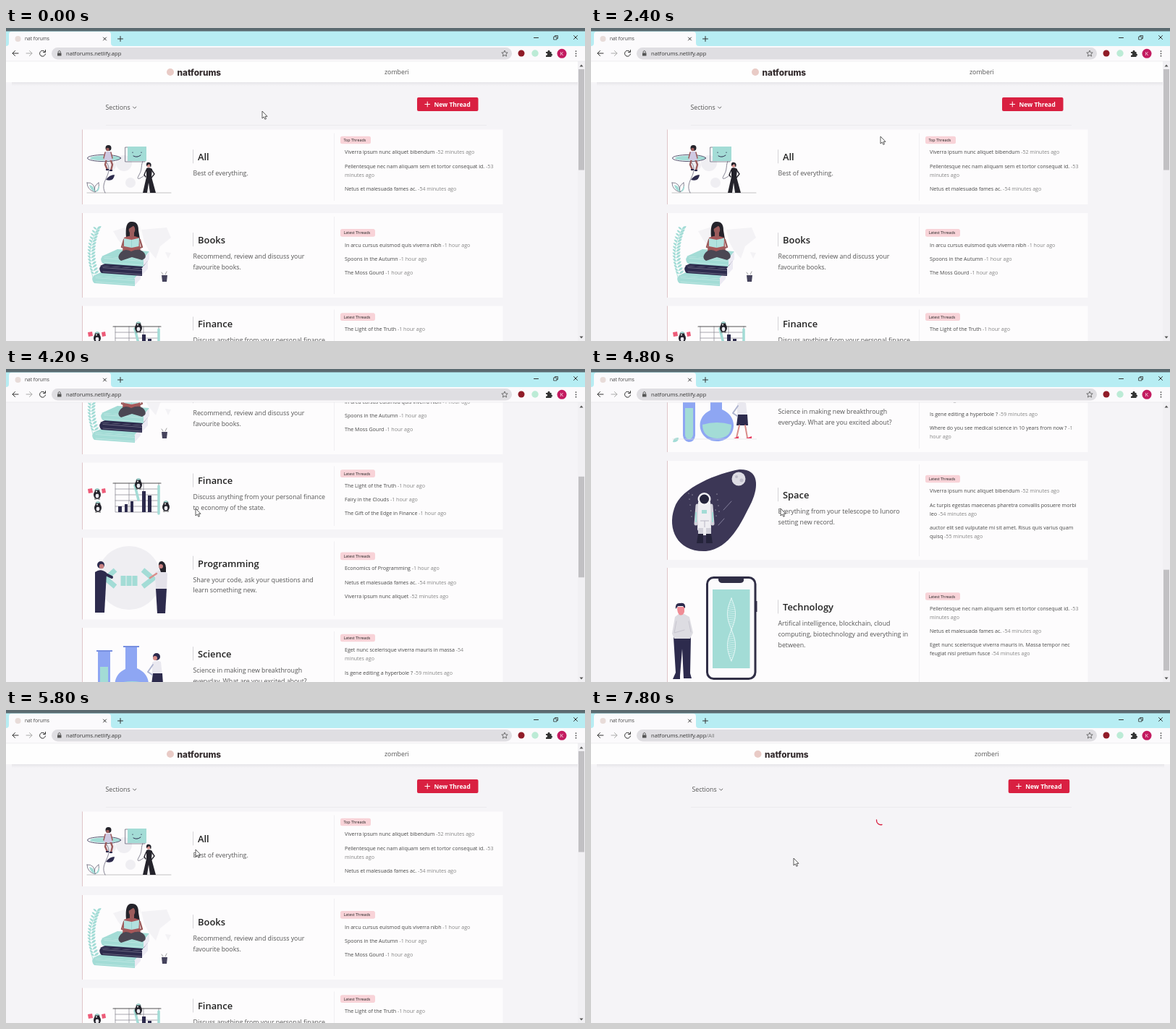
Write an HTML page that moves like this. It is 800 px wide and 433 px high and loops after 8 s.

```html
<!DOCTYPE html>
<html lang="en">
<head>
<meta charset="utf-8">
<title>nat forums</title>
<style>
  html, body { margin: 0; width: 100%; height: 100%; overflow: hidden; background: #f5f4f7; }
  svg { display: block; width: 100vw; height: 100vh; }
  text { font-family: "Open Sans", "Noto Sans", sans-serif; fill: #555; }
  .small { font-size: 7.1px; fill: #484848; }
  .small .ago { fill: #858585; }
  .desc { font-size: 8.8px; }
  .title { font-size: 12.9px; font-weight: 600; fill: #222; }
  .badge { font-size: 5.4px; fill: #222; }
  .line { fill: none; stroke-linecap: round; stroke-linejoin: round; }
  .ink { fill: #2d2b4d; } .teal { fill: #a3dcd6; } .skin { fill: #9c5c5c; }
  .black { fill: #24232b; } .pale { fill: #efeef2; } .blue { fill: #8ea6f3; }
  #spinner, #path, .loading #cards, .loading #scrollbar, .loading #hover { display: none; }
  .loading #spinner, .loading #path { display: inline; }
  .loading #logo { transform: translateX(3.5px); }
  .loading #user { transform: translateX(7px); }
  .loading #sections { transform: translateX(2px); }
  .loading #button { transform: translateX(8.7px); }
</style>
</head>
<body>
<svg id="stage" viewBox="0 0 800 433" preserveAspectRatio="none">
  <defs>
    <clipPath id="view"><rect y="46" width="800" height="387"/></clipPath>
    <linearGradient id="shade" x2="0" y2="1">
      <stop stop-color="#e6e5e9"/><stop offset="1" stop-color="#f5f4f7"/>
    </linearGradient>

    <g id="art-all">
      <g class="pale"><circle cx="163" cy="187" r="11"/><circle cx="145" cy="190" r="7"/><circle cx="172" cy="214" r="7"/></g>
      <g class="line" stroke="#555468" stroke-width=".7">
        <path d="M112 228H228" stroke="#aaa"/>
        <path d="M137 228C128 212 150 202 139 186M193 179C184 188 190 193 184 203S188 207 192 203"/>
        <rect x="165" y="165" width="27" height="20"/>
        <path d="M112 214Q123 213 123 227Q112 224 112 214M128 214Q120 219 123 227Q130 223 128 214"/>
      </g>
      <path class="teal" d="M115 217Q122 218 123 227Q116 224 115 217M129 218L124 227Q130 225 129 218"/>
      <path class="ink" d="M138 210Q143 203 150 203Q149 213 138 210"/>
      <ellipse class="teal" cx="137" cy="180" rx="21" ry="3.6"/>
      <ellipse class="line" cx="135.500" cy="180" rx="23" ry="4.600" stroke="#2d2b4d" stroke-width=".8"/>
      <path class="line" d="M139 181L137 189L140 196M144 181L147 189L145 197" stroke="#9c5c5c" stroke-width="2.400"/>
      <path class="ink" d="M138 195h4v2h-4ZM143 196h4v2h-4Z"/>
      <path d="M137 171H145L147 183H135Z" fill="#cfc9e2"/>
      <path class="line" d="M137 172L135 180M145 172L147 180" stroke="#9c5c5c" stroke-width="1.5"/>
      <circle class="black" cx="141.500" cy="166" r="4"/><circle class="skin" cx="140.500" cy="168" r="2.300"/>
      <rect class="teal" x="168" y="164" width="26" height="20"/>
      <g class="line" stroke="#2d2b4d" stroke-width="1"><path d="M176 177Q181 180 186 176M175 172v.5M187 172v.5"/></g>
      <path class="black" d="M194 194Q198 192 202 195L201 206L207 228H199L197 214L195 228H189L194 206Z"/>
      <path class="line" d="M194 196L191 203L193 206M201 196L205 202L201 207" stroke="#24232b" stroke-width="1.4"/>
      <circle cx="197" cy="190" r="2.7" fill="#d89591"/><path class="black" d="M194 191Q193 185 198 186Q202 187 200 193L198 188Z"/>
    </g>

    <g id="book">
      <path d="M0 0L22-10L66-7L58 4Z"/>
      <path d="M57 4L66-7V4L57 14Z" fill="#eceaf3"/>
      <path d="M1 0L58 4V14L2 10Q-3 5 1 0"/>
      <path class="line" d="M4 2.500L57 6.500M4 8L57 12" stroke="#fff" stroke-opacity=".35" stroke-width=".8"/>
    </g>
    <g id="art-books">
      <g class="pale"><path d="M148 281L164 276L180 290L165 306L155 293ZM187 279L222 276L228 290L213 302L207 319L197 307L191 296ZM220 310L228 311L224 319Z" opacity=".7"/></g>
      <g id="fern"></g>
      <use href="#book" class="teal" x="120" y="343"/>
      <use href="#book" class="ink" x="130" y="329"/>
      <use href="#book" class="teal" x="132" y="316"/>
      <path class="black" d="M166 290Q164 268 173 268Q183 267 183 280L185 292Z"/>
      <path d="M163 290Q173 285 184 290L186 309H161Z" fill="#a85759"/>
      <path class="skin" d="M171 283H177V290H171Z"/><ellipse class="skin" cx="174" cy="279" rx="4.300" ry="6"/>
      <path class="black" d="M168 279Q169 270 175 271L180 274L177 273Z"/>
      <path d="M158 311Q164 304 173 309Q184 303 191 311Q196 318 188 321L174 317L159 322Q152 318 158 311" fill="#4b4753"/>
      <path class="line" d="M163 293L160 303L168 306M185 293L188 303L180 306" stroke="#9c5c5c" stroke-width="2.400"/>
      <path d="M163 291L173.500 293L184 290.500L183.500 302L173.500 304L163 302Z" fill="#b2e1de"/>
      <path d="M173.500 293V304" stroke="#8bc8c5" stroke-width=".6"/>
      <path d="M215 342H223L222 351H216Z" fill="#45435c"/><path class="line" d="M217 341L215 338M220 341L222 337" stroke="#777" stroke-width=".7"/>
    </g>

    <g id="penguin">
      <ellipse class="black" rx="5" ry="6"/><ellipse cy="1.500" rx="2.300" ry="3" fill="#e9e8ee"/>
      <circle class="black" cy="-5" r="3.400"/><circle cx="-1" cy="-4.500" r="1" fill="#fff"/>
      <path class="teal" d="M-3.500-6.500Q0-11.500 3.500-6.500Z"/><path d="M-4 6H-1M1 6H4" stroke="#555" stroke-width="1.2"/>
    </g>
    <g id="art-finance">
      <g class="line" stroke="#85848f" stroke-width=".7">
        <path d="M151 413V453H211V413M151 421H210M151 429H210M151 437H210M151 445H210M170 413V453M190 413V453"/>
        <path d="M148 413H214" stroke="#555" stroke-width="1.100"/>
      </g>
      <path class="ink" d="M155 445h5v8h-5ZM164 442h4v11h-4ZM172 438h4v15h-4ZM188 424h5v29h-5ZM196 430h5v23h-5Z"/>
      <path class="line" d="M178 416L183 436M211 417V455" stroke="#a3dcd6" stroke-width="3.500"/>
      <path d="M113 421l6-1 1 6-6 1ZM132 421l5-1 1 6-5 1Z" fill="#ed5b78"/>
      <use href="#penguin" x="126" y="429"/><use href="#penguin" x="127" y="447"/>
      <use href="#penguin" x="183" y="415"/><use href="#penguin" x="221" y="446"/>
    </g>

    <g id="art-coding">
      <circle class="pale" cx="170" cy="544" r="44"/>
      <path class="line" d="M151 533L138 545L151 556M189 533L203 545L189 556M162 541V555M170 541V555M178 541V555" stroke="#a3dcd6" stroke-width="7" style="stroke-linecap:butt"/>
      <path class="ink" d="M123 536Q131 530 139 537L136 592H123Z"/>
      <path class="line" d="M136 538L146 543" stroke="#2d2b4d" stroke-width="4"/>
      <path d="M206 536Q216 530 223 538L222 560H207Z" fill="#e4e2ea"/><path class="ink" d="M207 559H222L220 593H209Z"/>
      <path class="line" d="M208 538L199 544" stroke="#d98e8b" stroke-width="2.500"/>
      <circle class="ink" cx="131" cy="526" r="5"/><circle cx="132" cy="528" r="3.2" fill="#c77f80"/>
      <path class="black" d="M211 528Q210 520 216 521Q222 523 221 536H214Z"/><circle cx="214" cy="528" r="3" fill="#c77f80"/>
    </g>

    <g id="art-science">
      <path class="blue" d="M127 646H144V705Q143 714 135 714Q128 713 127 705ZM165 640H181V669C207 680 199 713 174 713S141 681 165 670Z"/>
      <path class="teal" d="M130 667H141V704Q140 710 135 710Q130 709 130 704ZM154 690Q174 684 194 690Q194 709 174 709Q154 708 154 690"/>
      <path d="M125 645H147M162 639H184" stroke="#778fe0" stroke-width="2"/>
      <path class="teal" d="M113 714Q114 707 121 708Q121 715 113 714"/>
      <path d="M202 661Q207 657 214 660L216 679H202Z" fill="#e9e8ef"/>
      <path class="ink" d="M203 676H216L217 691H201Z"/>
      <path class="line" d="M205 691L201 708M213 691L216 708" stroke="#d98e8b" stroke-width="2"/>
      <path d="M197 709h7v-3ZM214 709h8v-3Z" fill="#e83e62"/>
      <path class="line" d="M203 664L196 674L202 678" stroke="#aeb4cf" stroke-width="2"/>
      <circle class="ink" cx="208" cy="653" r="5"/><circle cx="206" cy="655" r="3" fill="#d98e8b"/>
      <path d="M112 710H229" stroke="#ddd" stroke-width=".6"/>
    </g>

    <g id="art-space">
      <path d="M205 752C232 751 232 775 222 797C207 827 192 861 159 865C120 867 105 835 115 806C124 776 177 757 205 752Z" fill="#3c3756"/>
      <circle cx="204" cy="765" r="9.5" fill="#dddce4"/><g fill="#bfbdca"><circle cx="201" cy="762" r="2"/><circle cx="208" cy="767" r="2.5"/></g>
      <g id="stars" fill="#fff"></g>
      <path class="line" d="M183 808L194 796M176 829L184 820" stroke="#a4a1bc" stroke-width=".7"/>
      <path class="line" d="M147 802L145 827M166 802L168 827" stroke="#d2d1da" stroke-width="5"/>
      <path d="M148 797H165L166 835L160 843H151L147 835Z" fill="#efeef2"/>
      <path d="M148 833h7v9h-7ZM159 833h7v9h-7Z" fill="#d2d1da"/>
      <path d="M148 841h7v13h-9ZM159 841h7l2 13h-9Z" fill="#25243b"/>
      <circle cx="156.500" cy="793" r="9" fill="#f3f2f5"/><circle cx="156.500" cy="793" r="6.500" fill="#25243b"/>
      <path class="teal" d="M153 808h7v5h-7ZM144 811h2v14h-2ZM167 811h2v14h-2Z"/>
      <path d="M151 823H163M157 823V832" stroke="#b8b7c4" stroke-width="1"/>
    </g>

    <g id="art-tech">
      <rect x="160.500" y="901.500" width="66.500" height="140" rx="9" fill="#fbfafc" stroke="#302e46" stroke-width="3"/>
      <path d="M176 902H211V906Q210 909 206 909H181Q177 909 176 905Z" fill="#302e46"/><path d="M228 934V949" stroke="#302e46" stroke-width="3"/>
      <rect class="teal" x="168" y="918" width="51.500" height="109"/>
      <g id="helix" class="line" stroke="#effafa" stroke-width=".8"></g>
      <path class="ink" d="M114 984H138L137 1034L139 1041H128L126 1000L123 1037V1042H113L117 1033Z"/>
      <path d="M116 956L121 952H129L136 956L141 978L137 986H115L112 979Z" fill="#dddce2"/>
      <path class="line" d="M118 962L115 978L129 974M135 962L138 977" stroke="#c7c5cf" stroke-width="1"/>
      <path d="M119 942H129V949Q127 955 122 953Q119 950 119 942" fill="#f08c95"/>
      <path class="ink" d="M117 945Q116 936 123 937Q131 935 130 944L127 941H120Z"/>
    </g>
  </defs>

  <rect width="800" height="433" fill="#f5f4f7"/>
  <g clip-path="url(#view)">
    <g id="page">
      <rect y="46" width="800" height="29" fill="#fefefe"/>
      <rect x="8" y="75" width="784" height="5" fill="url(#shade)"/>
      <g id="logo">
        <circle cx="227" cy="61" r="5" fill="#e9cbc6"/>
        <text x="236.500" y="65.500" style="font:800 11.8px Inter,sans-serif;fill:#332b2d">natforums</text>
      </g>
      <text id="user" class="desc" x="523" y="64">zomberi</text>
      <g id="sections">
        <text class="desc" x="137.500" y="113">Sections</text>
        <path class="line" d="M175.500 109L177.700 111.200L179.900 109" stroke="#555" stroke-width=".9"/>
      </g>
      <g id="button">
        <rect x="568" y="96" width="84.500" height="19" rx="2" fill="#d92041"/>
        <path d="M578.500 105.500H586M582.250 101.700V109.300" stroke="#fff"/>
        <text x="591.500" y="108.700" style="font-size:8.4px;font-weight:700;fill:#fff">New Thread</text>
      </g>
      <path d="M138 134.500H664" stroke="#e9e7ec" stroke-width=".8"/>
      <g id="cards"></g>
      <path id="spinner" class="line" d="M394.500 152A6 6 0 0 0 402 158.500" stroke="#d92041" stroke-width="1.300"/>
      <g id="hover"><rect x="259" y="168" width="29" height="19" fill="#fbdfe1"/><text class="title" x="265" y="183" style="fill:#544a4c">All</text></g>
    </g>
    <g id="scrollbar">
      <rect x="790" y="46" width="10" height="387" fill="#f1f0f3"/>
      <rect id="thumb" x="791" y="57" width="8" height="139.500" fill="#c1c0c3"/>
      <path d="M792.500 53.500L795 50.500L797.500 53.500ZM792.500 426.500L795 429.500L797.500 426.500Z" fill="#555"/>
    </g>
  </g>

  <g id="browser">
    <rect width="800" height="25" fill="#b7edf3"/><rect width="800" height="4.500" fill="#5b6a70"/>
    <path d="M0 25Q4 25 4 21V9Q4 5 8 5H141Q145 5 145 9V21Q145 25 149 25H800V46H0Z" fill="#fbfafc"/>
    <path d="M0 46H800" stroke="#e4e3e6" stroke-width=".6"/>
    <circle cx="16.500" cy="15" r="4" fill="#e8dcd9"/>
    <text x="26" y="17.300" style="font-size:6.6px;fill:#444">nat forums</text>
    <g class="line" stroke="#333">
      <path d="M134.500 13l4 4m0-4l-4 4M154.500 15h7M158 11.500v7M784.500 10.500l5 5m0-5l-5 5M729.500 13.500h6"/>
      <path d="M757 12h4v4h-4ZM758.500 12V10.500H762.500V14.500H761" stroke-width=".8"/>
      <path d="M17 35H9M12.500 31.500L9 35L12.500 38.500"/><path d="M28 35H36M32.500 31.500L36 35L32.500 38.500" stroke="#aaa"/>
      <path d="M53.500 32.500A4 4 0 1 0 54.500 36M54.500 30.500V33.500H51.500"/>
    </g>
    <rect x="63" y="27" width="636" height="16.500" rx="8.250" fill="#dfdee2"/>
    <path d="M71 34.500h5.500v4h-5.500Z" fill="#555"/><path class="line" d="M72.200 34V32.500Q73.700 30.300 75.200 32.500V34" stroke="#555"/>
    <text x="83" y="38" style="font-size:7.6px;fill:#333">natforums.netlify.app<tspan id="path" fill="#777">/All</tspan></text>
    <path d="M689 31l1.200 2.800 3 .3-2.300 2 .7 3-2.600-1.600-2.600 1.600.7-3-2.300-2 3-.3Z" fill="none" stroke="#555" stroke-width=".8"/>
    <circle cx="712" cy="35" r="4.500" fill="#901c28"/><circle cx="731" cy="35" r="4.700" fill="#bcebd6"/>
    <path d="M746 33h2.500a1.600 1.600 0 1 1 3 0H753.500v2.500a1.500 1.500 0 1 1 0 3V40H746V37.500a1.400 1.400 0 1 0 0-2.500Z" fill="#333"/>
    <circle cx="768" cy="35.300" r="6.500" fill="#c31b60"/><text x="768" y="37.800" text-anchor="middle" style="font-size:7px;fill:#fff">K</text>
    <path class="line" d="M787.500 32v.1M787.500 35.300v.1M787.500 38.600v.1" stroke="#444" stroke-width="1.700"/>
  </g>
  <path id="arrow" d="M0 0V10L2.300 7.900L3.900 11.300L5.500 10.600L4 7.300H7Z" fill="#fff" stroke="#333" stroke-width=".8"/>
  <path id="hand" d="M-1 0Q0-1.200 1 0V5L5 6Q6.500 6.500 6 9L5 13H0L-3 8Q-3 6.500-1 8Z" fill="#fff" stroke="#333" stroke-width=".8"/>
</svg>

<script>
  const $ = id => document.getElementById(id);

  // A "|" breaks a line; text after "~" is the age of a thread.
  const cards = [
    ["all", "All", 140.5, 103.5, "Best of everything.", "Top Threads",
      ["Viverra ipsum nunc aliquet bibendum ~-52 minutes ago", "Pellentesque nec nam aliquam sem et tortor consequat id. ~-53|minutes ago", "Netus et malesuada fames ac. ~-54 minutes ago"]],
    ["books", "Books", 256, 117, "Recommend, review and discuss your|favourite books.", "Latest Threads",
      ["In arcu cursus euismod quis viverra nibh ~-1 hour ago", "Spoons in the Autumn ~-1 hour ago", "The Moss Gourd ~-1 hour ago"]],
    ["finance", "Finance", 384.5, 92.5, "Discuss anything from your personal finance|to economy of the state.", "Latest Threads",
      ["The Light of the Truth ~-1 hour ago", "Fairy in the Clouds ~-1 hour ago", "The Gift of the Edge in Finance ~-1 hour ago"]],
    ["coding", "Programming", 488.5, 113, "Share your code, ask your questions and|learn something new.", "Latest Threads",
      ["Economics of Programming ~-1 hour ago", "Netus et malesuada fames ac. ~-54 minutes ago", "Viverra ipsum nunc aliquet ~-52 minutes ago"]],
    ["science", "Science", 613, 115, "Science in making new breakthrough|everyday. What are you excited about?", "Latest Threads",
      ["Eget nunc scelerisque viverra mauris in massa ~-54|minutes ago", "Is gene editing a hyperbole ? ~-59 minutes ago", "Where do you see medical science in 10 years from now ? ~-1|hour ago"]],
    ["space", "Space", 740, 137, "Everything from your telescope to lunoro|setting new record.", "Latest Threads",
      ["Viverra ipsum nunc aliquet bibendum ~-52 minutes ago", "Ac turpis egestas maecenas pharetra convallis posuere morbi|leo ~-54 minutes ago", "auctor elit sed vulputate mi sit amet. Risus quis varius quam|quisq ~-55 minutes ago"]],
    ["tech", "Technology", 888, 166, "Artifical intelligence, blockchain, cloud|computing, biotechnology and everything in|between.", "Latest Threads",
      ["Pellentesque nec nam aliquam sem et tortor consequat id. ~-53|minutes ago", "Netus et malesuada fames ac. ~-54 minutes ago", "Eget nunc scelerisque viverra mauris in. Massa tempor nec|feugiat nisl pretium fusce ~-54 minutes ago"]]
  ];

  const text = (cls, x, y, s) => `<text class="${cls}" x="${x}" y="${y}">${s}</text>`;

  function threadText(thread, y) {
    let old = false;
    return thread.split("|").map((line, i) => {
      const [name, age] = old ? ["", line] : line.split("~");
      old = old || age !== undefined;
      return text("small", 468, y + 12 * i, name + (age ? `<tspan class="ago">${age}</tspan>` : ""));
    }).join("");
  }

  function cardMarkup([art, title, top, height, desc, badge, threads]) {
    const mid = top + height / 2, lines = desc.split("|");
    const titleY = mid - 14 - 7.3 * (lines.length - 1);
    const badgeY = mid - 12.5 - 6.2 * threads.join("|").split("|").length;
    let y = badgeY + 19.4;
    const list = threads.map(t => {
      const row = threadText(t, y);
      y += 19.2 + 12 * (t.split("|").length - 1);
      return row;
    }).join("");
    return `<rect x="106" y="${top}" width="580.500" height="${height}" fill="#fdfcfd"/>
      <path d="M105.500 ${top}v${height}" stroke="#dfc4c9"/>
      <path d="M453.500 ${top + 5}v${height - 10}" stroke="#eeecef" stroke-width=".8"/>
      <path d="M258.500 ${titleY - 10}v19" stroke="#d0cfd3" stroke-width=".9"/>
      <use href="#art-${art}"/>${text("title", 265, titleY + 4.8, title)}
      ${lines.map((s, i) => text("desc", 258.5, titleY + 26 + 14.6 * i, s)).join("")}
      <rect x="462" y="${badgeY - 5.3}" width="${badge[0] === "T" ? 42 : 48}" height="10.600" rx="2.500" fill="#f8d3d8"/>
      ${text("badge", 466.5, badgeY + 2, badge)}${list}`;
  }
  $("cards").innerHTML = cards.map(cardMarkup).join("");

  const repeat = (n, f) => Array.from({ length: n }, (_, i) => f(i)).join("");
  $("fern").innerHTML = `<path class="line" d="M128 275Q108 305 120 345" stroke="#a3dcd6" stroke-width=".8"/>` +
    repeat(15, i => {
      const y = 279 + i * 4.4, x = 117.5 + ((i - 8) / 8) ** 2 * 8;
      return `<path class="teal" d="M${x} ${y}q-1-4-5-4q1 4 5 4q1-5 6-5q0 4-6 5"/>`;
    });
  $("stars").innerHTML = repeat(12, i =>
    `<circle cx="${135 + i * 37 % 73}" cy="${785 + i * 23 % 38}" r=".5"/>`);
  const strand = side => "M" + repeat(31, i =>
    `${194 + side * 5.5 * Math.sin(i / 30 * 2 * Math.PI)} ${930 + i * 2.9} `);
  $("helix").innerHTML = `<path d="${strand(1)}"/><path d="${strand(-1)}"/>` + repeat(30, i => {
    const w = 5.5 * Math.sin(i / 30 * 2 * Math.PI);
    return `<path d="M${194 - w} ${930 + i * 2.9}L${194 + w} ${931.5 + i * 2.9}" stroke-width=".5"/>`;
  });

  const scrollKeys = [[3600, 0], [3800, 5], [4000, 100], [4400, 410], [4800, 613], [5200, 110], [5400, 20], [5600, 0]];
  const pointerKeys = [[0, 354, 115], [2400, 400, 150], [2800, 380, 157], [3600, 262, 193], [5800, 262, 193], [6400, 277, 182], [7400, 277, 182], [7800, 280, 205]];

  function at(keys, t, col = 1) {
    const next = keys.findIndex(k => k[0] > t);
    if (next < 0) return keys[keys.length - 1][col];
    if (next === 0) return keys[0][col];
    const a = keys[next - 1], b = keys[next];
    return a[col] + (b[col] - a[col]) * (t - a[0]) / (b[0] - a[0]);
  }

  const LOOP = 8000, STEP = 200;
  function draw(now) {
    const t = Math.floor(now % LOOP / STEP) * STEP;
    const scroll = at(scrollKeys, t), x = at(pointerKeys, t), y = at(pointerKeys, t, 2);
    const loading = t >= 7600, hovering = t >= 6200 && !loading;
    $("stage").classList.toggle("loading", loading);
    $("page").setAttribute("transform", `translate(0 ${-scroll})`);
    $("thumb").setAttribute("y", 57 + scroll * 0.36);
    $("spinner").setAttribute("transform", `rotate(${(t - 7800) * 0.48} 400 153)`);
    $("hover").setAttribute("visibility", hovering ? "visible" : "hidden");
    for (const id of ["arrow", "hand"]) {
      $(id).setAttribute("transform", `translate(${x} ${y})`);
      $(id).setAttribute("visibility", (id === "hand") === hovering ? "visible" : "hidden");
    }
    requestAnimationFrame(() => draw(performance.now()));
  }
  draw(performance.now());
</script>
</body>
</html>
```
